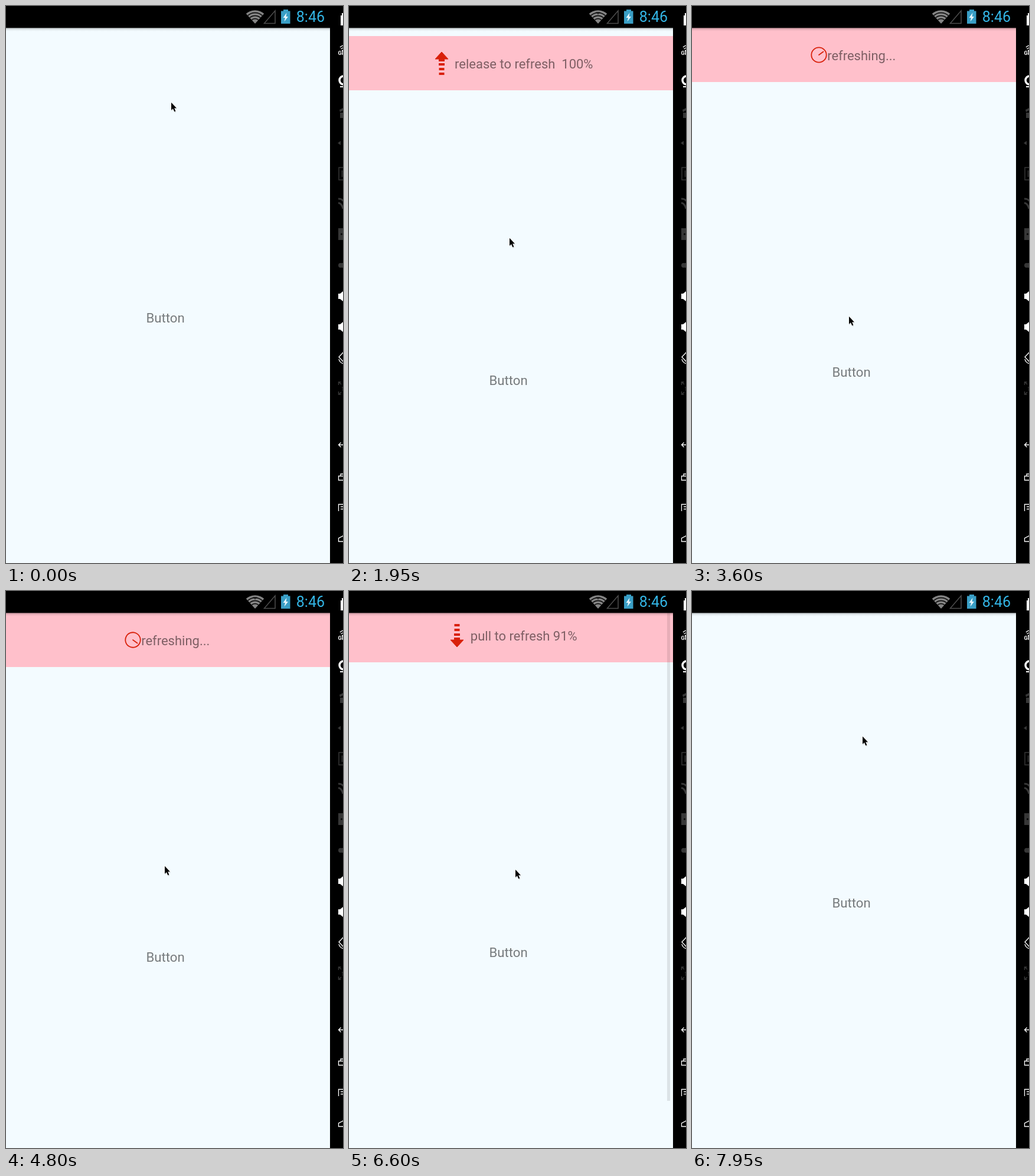
Animation, 571 px wide and 945 px high, one loop 8 s. Source, as an HTML page:

```html
<!DOCTYPE html>
<html lang="en">
<head>
<meta charset="utf-8">
<title>Pull to refresh</title>
<style>
  html, body { margin: 0; width: 100%; height: 100%; overflow: hidden; background: #000; }
  #stage { position: relative; width: 571px; height: 945px; overflow: hidden; background: #000;
    font-family: Roboto, "Open Sans", sans-serif; }
  #stage svg { display: block; flex: none; }
  #screen { position: absolute; left: 0; top: 37px; width: 549px; height: 908px;
    overflow: hidden; background: #f3fbff; color: rgba(0, 0, 0, .51); }
  #shade { position: absolute; left: 0; top: 0; width: 100%; height: 6px;
    background: linear-gradient(rgba(0, 0, 0, .42), rgba(0, 0, 0, .08) 40%, transparent); }
  #header { position: absolute; left: 0; top: -92px; width: 549px; height: 92.4px; background: #ffc0cb; }
  .row { display: flex; align-items: center; justify-content: center; height: 100%;
    font-size: 22px; white-space: pre; }
  .row span { position: relative; top: 1px; }
  #arrow { margin: 0 10.5px 0 9px; }
  #busy { padding-right: 2.5px; }
  #button { position: absolute; left: 237.4px; top: 478.7px; font-size: 22.2px; }
  #bar { position: absolute; left: 539px; top: 0; width: 5px; background: rgba(0, 0, 0, .31); }
  #chrome, #cursor { position: absolute; left: 0; top: 0; }
  #clock { position: absolute; right: 31px; top: 4px; font-size: 25px; color: #33b5e5; }
</style>
</head>
<body>
<div id="stage">
  <div id="screen">
    <div id="header">
      <div class="row" id="pull">
        <svg id="arrow" width="24" height="41" viewBox="0 0 24 41" fill="#d9200a">
          <path d="M12 1 23 13H1Z" stroke="#d9200a" stroke-linejoin="round"/>
          <path d="M7 13h10v4H7zM7 20h10v4H7zM7.500 28h9v4h-9zM7.500 36h9v4h-9z"/>
        </svg><span id="label"></span>
      </div>
      <div class="row" id="busy">
        <svg width="28" height="28" viewBox="-14 -14 28 28" fill="none" stroke="#d9200a" stroke-width="1.800">
          <g id="dial"><circle r="12.700"/><path d="M0 0 7.500-5.500" stroke-linecap="round"/></g>
        </svg><span>refreshing...</span>
      </div>
    </div>
    <div id="button">Button</div>
    <div id="shade"></div>
    <div id="bar"></div>
  </div>

  <svg id="chrome" width="571" height="945" fill="none">
    <!-- status bar -->
    <clipPath id="fan"><path d="M422 30 404 10V0H440V10Z"/></clipPath>
    <g clip-path="url(#fan)" stroke="#000" stroke-width="1.300">
      <circle cx="422" cy="30" r="23.500" fill="#838383"/>
      <circle cx="422" cy="30" r="18.500"/>
      <circle cx="422" cy="30" r="13.500"/>
      <circle cx="422" cy="30" r="8.500"/>
    </g>
    <path id="traffic" d="M418 10h8l-4 5z" fill="#000" fill-opacity=".45"/>
    <path d="M456 8V29.500H437.500Z" stroke="#4d4d4d" stroke-width="1.500"/>
    <path d="M470 6h8v2.500h3.500V30H466V8.500h4z" fill="#3a9fc6"/>
    <path d="M475.500 11.500 469.500 20h3.500l-1.500 6.500 6.500-8.500h-3.500z" fill="#e9f7fd"/>

    <!-- side toolbar, cut off by the right edge -->
    <g fill="#fff">
      <path d="M569 12h2v21h-4V16h2z"/>
      <path d="M566 136h5v2h-5z"/>
      <path id="speaker" d="M563 488h3l5-4v17l-5-4h-3z"/>
      <use href="#speaker" y="52"/>
      <text x="562.500" y="83" font-size="9" font-weight="700">GPS</text>
    </g>
    <g stroke="#fff" stroke-width="1.300">
      <path d="M566 70q3-3 7-3M567.500 73q2-2 5-2M569 76l3-2"/>
      <circle cx="572" cy="126" r="7" stroke-width="3.500"/>
      <path d="M572 587 564 595.500 572 604M564 599q1 6 8 8"/>
      <path d="M571 744.500h-7M567.500 740.500l-4 4 4 4"/>
      <path d="M572 797.500h-8.500v7h8.500M567 797v-3h5"/>
      <path d="M572 845.500h-8.500V857M567 849.500h5M567 853.500h5"/>
      <path d="M572 898.500l-8.500 4.500v5.500h8.500"/>
    </g>
    <g fill="#373737">
      <path d="M566 181h5v9h-5zM565 176l6-3v4l-5 3z"/>
      <path d="M567 229v7l-5-3.500z"/>
      <path d="M563 377h8v20h-8z"/>
      <circle cx="567" cy="440" r="4"/>
      <path d="M569 436h2v8h-2z"/>
      <text x="568" y="653" font-size="9">1:1</text>
    </g>
    <circle cx="568.500" cy="387" r="1.500" fill="#000"/>
    <g stroke="#373737" stroke-width="1.500">
      <path d="M572 274h-8v21h8M569.500 279v11"/>
      <path d="M563 327q6 0 9 4M563 334q6 1 8 10" stroke-width="3"/>
      <path d="M563.500 643v-5h4M564 638l4 4M563.500 654v5h4M564 659l4-4"/>
    </g>
  </svg>
  <div id="clock">8:46</div>

  <svg id="cursor" width="18" height="23.400" viewBox="0 -3 20 26">
    <path d="M.5 2V16L4 13 6.500 19 9 18 6.500 12H11Z" fill="#000" opacity=".18"/>
    <path d="M0 0V14.500L3.300 11.500 5.800 17.300 8.200 16.300 5.700 10.500H10Z"
      fill="#000" stroke="#fff" stroke-width="1" paint-order="stroke"/>
  </svg>
</div>

<script>
  const LOOP = 8000, STEP = 150, HEAD = 92, DRAG = .535, SETTLE = 450;

  // Pointer moves; each starts where the one before it ended.
  const MOVES = [
    { from: 0, to: 150, x: 278, y: 163 },
    { from: 750, to: 1350, x: 279, y: 220, pow: 1.9 },
    { from: 1350, to: 2400, x: 266, y: 525 },
    { from: 2400, to: 2700, x: 266, y: 527 },
    { from: 4650, to: 6000, x: 275, y: 316, pow: .57 },
    { from: 6150, to: 6600, x: 282, y: 473 },
    { from: 7050, to: 7950, x: 289, y: 247 }
  ];

  // After "up" the list settles at "rest", then closes.
  const PULLS = [
    { down: 1200, up: 2700, rest: HEAD, close: 4950 },
    { down: 6150, up: 7050, rest: 0, close: LOOP }
  ];

  const el = id => document.getElementById(id);
  const [header, pull, busy, arrow, label, dial, button, bar, traffic, cursor] =
    ["header", "pull", "busy", "arrow", "label", "dial", "button", "bar", "traffic", "cursor"].map(el);

  const clamp = v => Math.max(0, Math.min(1, v));
  const fall = age => (1 - clamp(age / SETTLE)) ** 2;

  function pointer(t) {
    let x = 280, y = 164;
    for (const m of MOVES) {
      const k = clamp((t - m.from) / (m.to - m.from)) ** (m.pow || 1);
      x += (m.x - x) * k;
      y += (m.y - y) * k;
    }
    return { x, y };
  }

  function distance(t, p) {
    if (t < p.down) return 0;
    if (t >= p.close) return p.rest * fall(t - p.close);
    const drag = DRAG * (pointer(Math.min(t, p.up)).y - pointer(p.down).y);
    return t < p.up ? drag : p.rest + (drag - p.rest) * fall(t - p.up);
  }

  function draw(t) {
    const p = PULLS[t < PULLS[1].down ? 0 : 1];
    const off = Math.round(distance(t, p));
    const refreshing = p.rest > 0 && t > p.up && t < p.close;
    const ready = off >= HEAD && t <= p.up;
    const percent = Math.min(100, Math.floor(off / HEAD * 100));

    header.style.transform = button.style.transform = `translateY(${off}px)`;
    pull.style.display = refreshing ? "none" : "flex";
    busy.style.display = refreshing ? "flex" : "none";
    label.textContent = (ready ? "release to refresh  " : "pull to refresh ") + percent + "%";
    arrow.style.transform = ready ? "none" : "rotate(180deg)";
    dial.setAttribute("transform", `rotate(${(t - 3600) * .36})`);

    // The scroll bar shows on touch, then fades.
    bar.style.opacity = t < p.down ? 0 : clamp((510 - t + p.down) / 200);
    bar.style.height = 900 - off * .86 + "px";

    traffic.style.visibility = t % 2550 >= 1200 ? "visible" : "hidden";
    const { x, y } = pointer(t);
    cursor.style.transform = `translate(${Math.round(x)}px, ${Math.round(y) - 3}px)`;
  }

  cursor.style.overflow = "visible";
  const start = performance.now();
  function tick() {
    const t = (performance.now() - start) % LOOP;
    draw(Math.floor(t / STEP) * STEP);
    requestAnimationFrame(tick);
  }
  tick();
</script>
</body>
</html>
```
